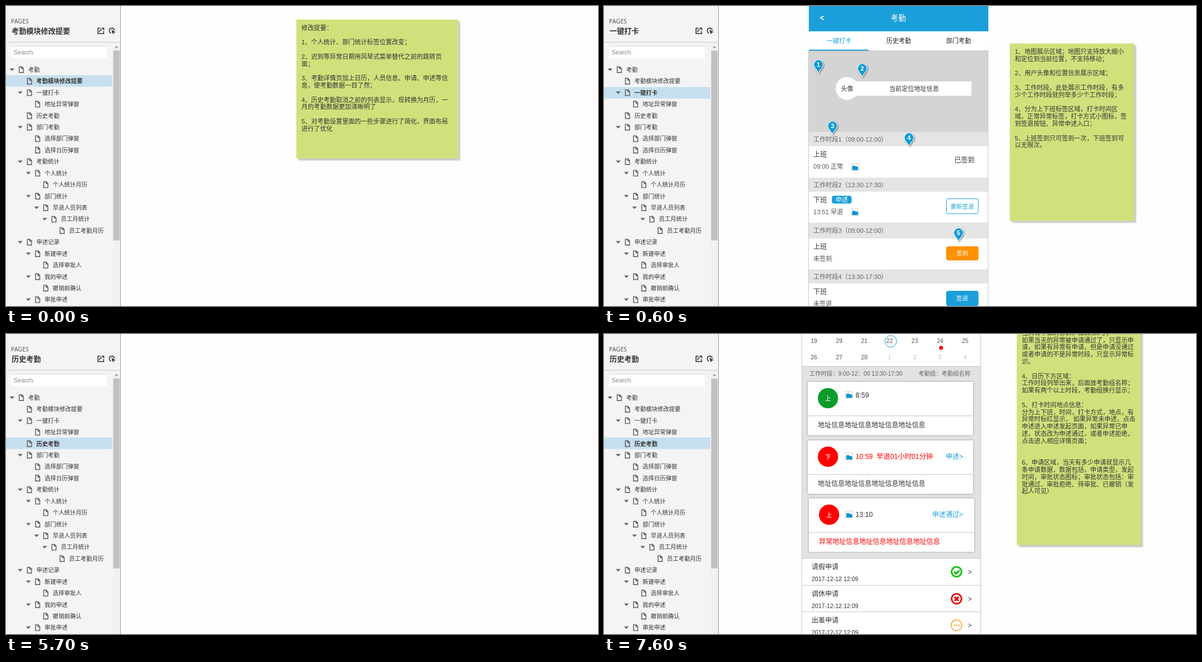
An HTML page for the animation above (8000 ms loop, 1052x533 px).

```html
<!DOCTYPE html>
<html lang="zh-CN">
<head>
<meta charset="utf-8">
<style>
html, body { margin: 0; width: 100%; height: 100%; overflow: hidden; background: #fefefe; }
svg { display: block; width: 100%; height: 100%; }
text { font-family: "Liberation Sans", "Noto Sans CJK SC", "Noto Sans CJK", sans-serif; white-space: pre; }
</style>
</head>
<body>
<svg id="stage" viewBox="0 0 1052 533" xmlns="http://www.w3.org/2000/svg">
  <defs>
    <filter id="noteShadow" x="-5%" y="-5%" width="112%" height="112%">
      <feDropShadow dx="3.5" dy="3.5" stdDeviation="1" flood-color="#000" flood-opacity=".22"/>
    </filter>
    <filter id="cardShadow" x="-5%" y="-10%" width="110%" height="120%">
      <feDropShadow dx="0" dy="0" stdDeviation="1.6" flood-color="#000" flood-opacity=".4"/>
    </filter>
  </defs>
  <g id="content"></g>
  <g id="sidebar"></g>
</svg>
<script>
const BLUE = '#1b9fda', DARK = '#333', GRAY = '#666', RED = '#f00', LINE = '#c8c8c8';
const SMALL = 10.25, BODY = 11.05, LARGE = 11.95;

// y is the vertical middle of the glyphs
const text = (x, y, size, str, fill = DARK, anchor = 'start', extra = '') =>
  `<text x="${x}" y="${y + size * .37}" font-size="${size}" fill="${fill}" text-anchor="${anchor}" ${extra}>${str.replace(/</g, '&lt;')}</text>`;
const mid = (x, y, size, str, fill, extra) => text(x, y, size, str, fill, 'middle', extra);
const rect = (x, y, w, h, fill, extra = '') =>
  `<rect x="${x}" y="${y}" width="${w}" height="${h}" fill="${fill}" ${extra}/>`;
const circle = (x, y, r, fill, extra = '') => `<circle cx="${x}" cy="${y}" r="${r}" fill="${fill}" ${extra}/>`;
const path = (d, fill, extra = '') => `<path d="${d}" fill="${fill}" ${extra}/>`;
const hline = (x, y, w, color = LINE) => rect(x, y, w, 1, color);
const BOLD = 'font-weight="bold"';

function note(x, y, w, h, firstLine, lines) {
  return rect(x, y, w, h, '#d0e17b', 'filter="url(#noteShadow)"') +
    lines.split('\n').map((s, i) => text(x + 9, firstLine + i * 12.8, BODY, s)).join('');
}

const picture = (x, y) =>
  rect(x - 6, y - 6, 12, 12, '#fff', 'stroke="#c4c4c4" stroke-width=".8"') +
  path(`M${x - 5} ${y + 5.5}v-6q3-4 5.5-.5q2.5-1 5 1.5v5z`, '#0c96d2');

const pin = (x, y, n) =>
  path(`M${x} ${y + 15}C${x - 3} ${y + 9} ${x - 8.5} ${y + 5} ${x - 8.5} ${y}a8.5 8.5 0 0 1 17 0C${x + 8.5} ${y + 5} ${x + 3} ${y + 9} ${x} ${y + 15}z`,
    '#0c9bd7', 'stroke="#fff" stroke-width="1.2" style="filter:drop-shadow(1px 1px 1px #0008)"') +
  mid(x, y, 11.5, String(n), '#fff', BOLD);

const TREE = [
  [0, '考勤', 1], [1, '考勤模块修改提要'], [1, '一键打卡', 1], [2, '地址异常弹窗'], [1, '历史考勤'],
  [1, '部门考勤', 1], [2, '选择部门弹窗'], [2, '选择日历弹窗'], [1, '考勤统计', 1], [2, '个人统计', 1],
  [3, '个人统计月历'], [2, '部门统计', 1], [3, '早退人员列表', 1], [4, '员工月统计', 1], [5, '员工考勤月历'],
  [1, '申述记录', 1], [2, '新建申述', 1], [3, '选择审批人'], [2, '我的申述', 1], [3, '撤销前确认'], [2, '审批申述', 1]
];

function sidebar(selected) {
  const rows = TREE.map(([level, label, open], i) => {
    const x = level * 14.5, y = 113 + i * 20.43;
    return (i === selected ? rect(0, Math.round(y - 10.3), 189, 20.4, '#c6dfee') : '') +
      (open ? path(`M${x + 6.5} ${y - 2}h8.6l-4.3 4.5z`, '#666') : '') +
      path(`M${x + 23.5} ${y - 5}h4.5l3 3v7.3h-7.5zM${x + 27.8} ${y - 5}v3.3h3.2`, 'none', 'stroke="#555" stroke-width="1.4"') +
      text(x + 39.5, y, SMALL, label, DARK, 'start', i === selected ? BOLD : '');
  }).join('');
  return rect(0, 0, 204, 533, '#f4f4f4') + rect(203, 0, 1, 533, '#999') +
    text(9, 27, 10, 'PAGES', '#444', 'start', 'style="font-family:\'Open Sans\',sans-serif" letter-spacing=".4"') +
    text(10, 44.5, 13, TREE[selected][1], DARK, 'start', BOLD) +
    path('M168.5 39.5h-5v9.5h10v-4.5M166 46.5q.5-4 5-5', 'none', 'stroke="#333" stroke-width="1.6"') +
    path('M169.5 38.5h5v5z', '#333') +
    path('M187 48.3a4.5 4.5 0 1 1 5.5-5', 'none', 'stroke="#333" stroke-width="1.6"') +
    path('M187 42l8 4.5-3.3.7-1.7 3.3z', '#333') +
    hline(0, 64, 203, '#ccc') +
    rect(9, 72, 170, 21, '#fff') + hline(9, 71, 170, '#ddd') + text(13.5, 82.5, 10.8, 'Search', '#888') +
    rect(190, 65, 13, 468, '#f1f1f1') + rect(190.5, 79, 11.5, 337.5, '#c1c1c1') + path('M193 74.5h6.4l-3.2-3.5z', '#999') +
    rows;
}

function phoneTop(x, activeTab) {
  const tabs = ['一键打卡', '历史考勤', '部门考勤'];
  return rect(x, 0, 319, 45, BLUE) + mid(x + 23.5, 21, 14, '<', '#fff', BOLD) + mid(x + 159, 21, 13.65, '考勤', '#fff') +
    rect(x, 45, 319, 34, '#fff') + hline(x, 79, 319) +
    tabs.map((s, i) => mid(x + 53.5 + i * 106.3, 61.5, BODY, s, i === activeTab ? BLUE : '#222')).join('') +
    rect(x + activeTab * 106.3, 77.5, 106.3, 2, BLUE);
}

const SUMMARY = `修改提要：

1、个人统计、部门统计标签位置改变；

2、迟到等异常日期用风琴式菜单替代之前的跳转页
面；

3、考勤详情页加上日历，人员信息、申请、申述等信
息，使考勤数据一目了然；

4、历史考勤取消之前的列表显示，现转换为月历，一
月的考勤数据更加清晰明了

5、对考勤设置里面的一些步骤进行了简化，界面布局
进行了优化`;

const CLOCK_NOTE = `1、地图展示区域；地图只支持放大缩小
和定位到当前位置，不支持移动；

2、用户头像和位置信息展示区域；

3、工作时段，此处展示工作时段，有多
少个工作时段就列举多少个工作时段；

4、分为上下班标签区域，打卡时间区
域，正常异常标签，打卡方式小图标，签
到签退按钮、异常申述入口；

5、上班签到只可签到一次，下班签到可
以无限次。`;

const HISTORY_NOTE = `页面解释：
1、标签内容为历史考勤；

2、第一行内容有：被查看人员的头像和
姓名，以及下方日历选中的日期和星期；

3、日历部分：
左右切换月份，上下切换年份；
须有当天的标识，比如图中22号；
有选中的标识，如8号；
当天有异常的标识，24号
当天有申请的标识，如10,16号；
如果当天的异常被申请通过了，只显示申
请，如果有异常有申请，但是申请没通过
或者申请的不是异常时段，只显示异常标
识。

4、日历下方区域：
工作时段列举出来，后面放考勤组名称；
如果有两个以上时段，考勤组换行显示；

5、打卡时间地点信息：
分为上下班，时间，打卡方式，地点，有
异常时标红显示， 如果异常未申述，点击
申述进入申述发起页面，如果异常已申
述，状态改为申述通过，或者申述拒绝，
点击进入相应详情页面；


6、申请区域，当天有多少申请就显示几
条申请数据，数据包括，申请类型，发起
时间，审批状态图标；审批状态包括：审
批通过、审批拒绝、待审批、已撤销（发
起人可见）`;

const summaryPage = () => note(516, 24, 287.5, 247, 38.5, SUMMARY);

function clockPage() {
  const button = (y, h, label, fill, color, stroke = fill) =>
    rect(608.5, y, 56.5, h, fill, `rx="3" stroke="${stroke}"`) + mid(636.5, y + h / 2, 10.4, label, color);
  const slots = [
    [224, 25, '1（09:00-12:00）', '上班', '09:00 正常'],
    [305, 25, '2（13:30-17:30）', '下班', '13:51 早退'],
    [385, 28, '3（09:00-12:00）', '上班', '未签到'],
    [468, 25, '4（13:30-17:30）', '下班', '未签退']
  ].map(([y, h, period, shift, status]) =>
    rect(364, y, 319, h, '#e4e4e4') +
    text(372, y + h / 2, BODY, '工作时段' + period, GRAY) +
    text(372, y + h + 14.5, LARGE, shift) + text(372, y + h + 35.8, BODY, status, '#555')).join('');
  return rect(364, 0, 319, 549, '#fff') + phoneTop(364, 0) +
    rect(364, 80, 319, 144, '#d4d4d4') +
    rect(445, 134, 208, 25.5, '#fff') + circle(432, 146.5, 20.3, '#fff') +
    mid(432, 147, BODY, '头像') + mid(551, 147, BODY, '当前定位地址信息') +
    slots + picture(446, 286) + picture(446, 366) + mid(640.5, 273.5, LARGE, '已签到') +
    rect(405, 337, 35, 14, BLUE, 'rx="4"') + mid(422.5, 344, BODY, '申述', '#fff') +
    button(342.5, 26.5, '重新签退', '#fff', BLUE, BLUE) +
    button(427.5, 24, '签到', '#ff9100', '#fff') + button(506.5, 26, '签退', BLUE, '#fff') +
    rect(363, 80, 1, 469, LINE) + rect(682, 80, 1, 469, LINE) + hline(363, 548, 320) +
    [[381, 104], [459, 111], [406, 213], [542, 234], [630, 403]].map(([x, y], i) => pin(x, y, i + 1)).join('') +
    note(721, 66.5, 221, 315, 81, CLOCK_NOTE);
}

function calendar() {
  const column = i => 373 + i * 44.8;
  const weeks = ['29 30 31 1 2 3 4', '5 6 7 8 9 10 11', '12 13 14 15 16 17 18', '19 29 21 22 23 24 25', '26 27 28 1 2 3 4'];
  const rowY = [171.5, 195.5, 222.5, 249.5, 278];
  return [...'一二三四五六日'].map((s, i) => mid(column(i), 142.5, LARGE, s)).join('') +
    circle(508.5, 196, 10.7, BLUE) + circle(509.5, 250, 10.3, '#fff', `stroke="${BLUE}"`) +
    circle(600, 207, 3.3, BLUE) + circle(554, 234, 3.3, BLUE) + circle(599, 261.5, 3.5, RED) +
    weeks.map((week, r) => week.split(' ').map((day, c) => {
      const outside = r === 0 && c < 3 || r === 4 && c > 2, chosen = r === 1 && c === 3;
      return mid(column(c), rowY[r], 10.5, day,
        chosen ? '#fff' : outside ? '#c4c4c4' : '#555', chosen ? BOLD : '');
    }).join('')).join('');
}

function card(x, y, badge, badgeColor, time, color, address, addressColor, link = '', timeY = 28.5) {
  return rect(x, y, 294, 95, '#fff', 'filter="url(#cardShadow)"') + hline(x, y + 60, 294) +
    circle(x + 36, y + 29, 18, badgeColor) + mid(x + 36, y + 29.5, BODY, badge, '#fff') +
    picture(435.5, y + timeY) + text(447, y + timeY, 12.2, time, color) +
    text(638, y + 29, LARGE, link, BLUE, 'end') + text(x + 18, y + 76.5, LARGE, address, addressColor);
}

function requestRow(i, title, color, mark) {
  const y = Math.round(635 + i * 47.6);
  return hline(352, y, 317) + text(369, y + 16, LARGE, title) + text(369, y + 37, 10.5, '2017-12-12 12:09') +
    mark(626.5, y + 24.5, color) + mid(650, y + 24.5, 12, '>', '#444');
}
const ring = (x, y, color, width) => circle(x, y, 10.3 - width / 2, '#fff', `stroke="${color}" stroke-width="${width}"`);
const tick = (x, y, c) => ring(x, y, c, 3) + path(`M${x - 4.5} ${y}l3.5 3.5 6-6`, 'none', `stroke="${c}" stroke-width="3.2"`);
const cross = (x, y, c) => ring(x, y, c, 3) + path(`M${x - 3.5} ${y - 3.5}l7 7m0-7l-7 7`, 'none', `stroke="${c}" stroke-width="3.2"`);
const dots = (x, y, c) => ring(x, y, c, 1.5) + [-4, 0, 4].map(d => circle(x + d, y, 1.3, c)).join('');

function historyPage() {
  const place = '地址信息'.repeat(4);
  return rect(351, 0, 319, 790, '#fff') + phoneTop(351, 1) +
    circle(374.5, 106, 15.5, '#f4f4f4', 'stroke="#ccc"') + rect(362, 93.5, 25.5, 26, '#fff') +
    path('M361.5 117V105l7-7q3-1 6 2l5 4q4-2 6 1l2 3v9q-1 2.5-4 2.5h-18q-3 0-4-2.5z', '#0c96d2') +
    text(399, 106, LARGE, '姓名') + text(658, 106, 10.4, '2018-02-01 星期四', DARK, 'end') +
    hline(351, 130, 319) + calendar() +
    rect(351, 294, 319, 341, '#e2e2e2') + hline(351, 294, 319) +
    text(365, 307.5, SMALL, '工作时段：9:00-12：00 13:30-17:30', GRAY) + text(651, 307.5, SMALL, '考勤组：考勤组名称', GRAY, 'end') +
    card(362, 322, '上', '#0c9c2b', '8:59', DARK, place, DARK, '', 23) +
    card(362, 426, '下', RED, '10:59  早退01小时01分钟', RED, place, DARK, '申述>') +
    card(364, 529, '上', RED, '13:10', DARK, '异常' + place, RED, '申述通过>') +
    requestRow(0, '请假申请', '#12c312', tick) + requestRow(1, '调休申请', '#e80f0f', cross) + requestRow(2, '出差申请', '#f0a020', dots) +
    rect(351, 80, 1, 710, LINE) + rect(669, 80, 1, 710, LINE) +
    note(733.5, 80, 220.5, 532, 94, HISTORY_NOTE);
}

const blank = () => '';
// start time in ms, selected tree row, page, scroll offset
const SCENES = [
  [0, 1, summaryPage, 0], [500, 2, blank, 0], [600, 2, clockPage, 0], [2600, 2, clockPage, 17],
  [4100, 2, blank, 0], [4400, 4, blank, 0], [5900, 4, historyPage, 0], [7600, 4, historyPage, 237]
];
const contentLayer = document.getElementById('content'), sidebarLayer = document.getElementById('sidebar');
let shown;

function frame() {
  const t = performance.now() % 8000;
  const scene = SCENES.findLast(s => s[0] <= t);
  if (scene !== shown) {
    const [, row, page, scroll] = shown = scene;
    contentLayer.innerHTML = page();
    contentLayer.setAttribute('transform', `translate(0 ${-scroll})`);
    sidebarLayer.innerHTML = sidebar(row);
  }
  requestAnimationFrame(frame);
}
frame();
</script>
</body>
</html>
```
